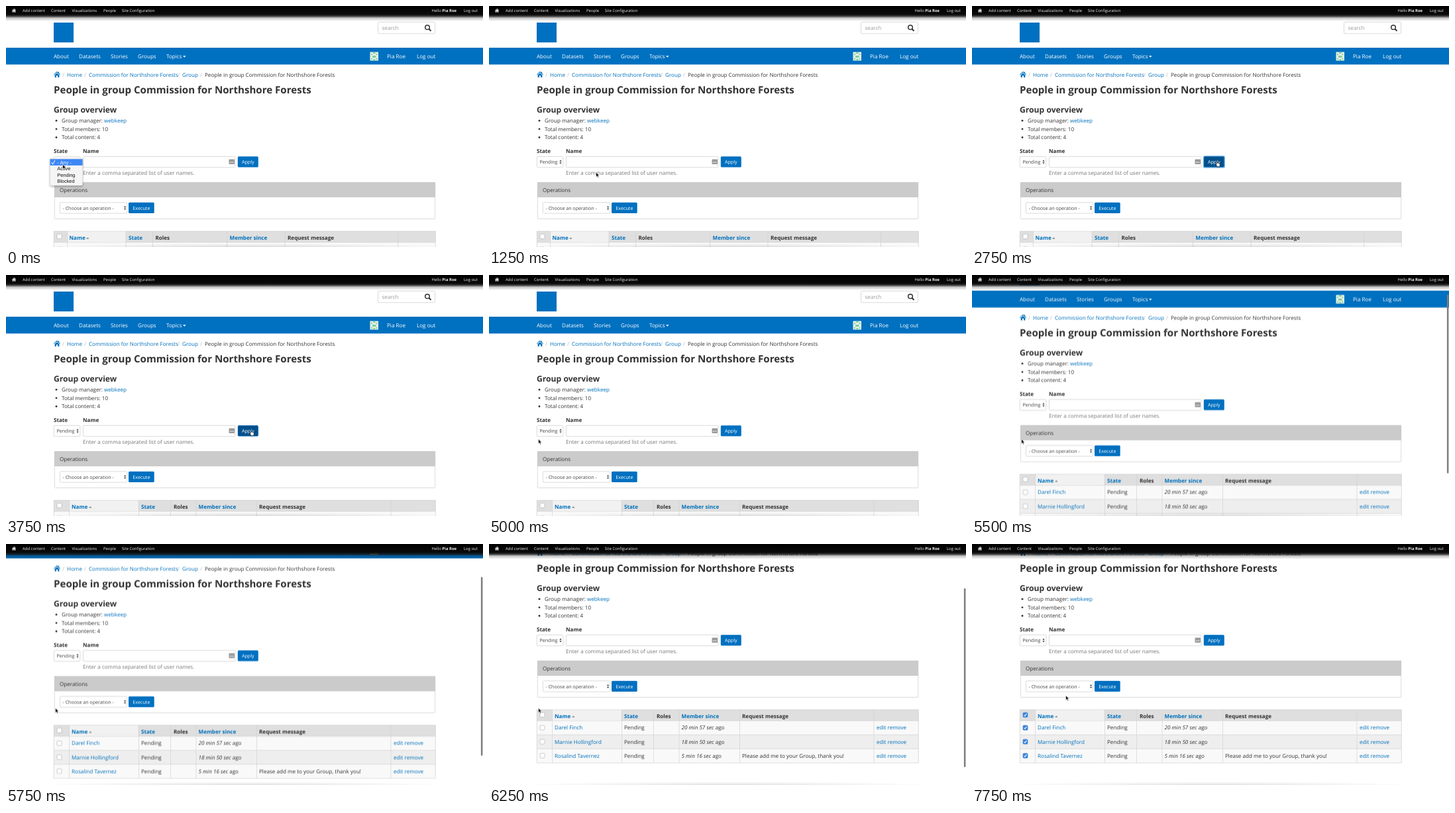
These frames come from a looping animation (720x364 px, 8 s). An HTML page:

```html
<!DOCTYPE html>
<html lang="en">
<head>
<meta charset="utf-8">
<title>Group members</title>
<style>
html, body { margin: 0; width: 100%; height: 100%; overflow: hidden; background: #fff; }
svg {
  display: block; width: 720px; height: 364px; fill: #333;
  font: 8.1px "Open Sans", sans-serif; text-rendering: geometricPrecision;
}
.link { fill: #0071bc; }
.b { font-weight: 700; }
.w { fill: #fff; }
.mute { fill: #767676; }
.field { fill: #fff; stroke: #ccc; stroke-width: .7; }
.btn, .nav { fill: #0070c0; }
.label { font-size: 7.2px; fill: #fff; text-anchor: middle; }
.opt { font-size: 7.1px; fill: #444; }
.bar { font-size: 5.95px; fill: #f2f2f2; }
.menu { font: 7.4px "Liberation Sans", Arial, sans-serif; fill: #111; }
.line { fill: none; stroke: #d3d3d3; stroke-width: .7; }
.page, .thumb, .cursor, .arrow, .hand, .popup, .hi, .t0, .t1, .t2, .old, .new, .hover, .ring, .tick, .sb {
  animation: 8s step-end infinite;
}
.page { animation-name: scroll; }
.thumb { animation-name: thumb; }
.sb { animation-name: sb; }
.cursor { animation-name: move; }
.arrow { animation-name: arrow; }
.hand { animation-name: hand; }
.popup { animation-name: popup; }
.hi { animation-name: hi; }
.t0 { animation-name: t0; }
.t1 { animation-name: t1; }
.t2 { animation-name: t2; }
.old { animation-name: old; }
.new { animation-name: new; }
.hover { animation-name: hover; }
.ring { animation-name: ring; }
.tick { animation-name: tick; }
@keyframes scroll {
  0% { transform: translateY(0); }
  65.625% { transform: translateY(-9px); }
  68.75% { transform: translateY(-39.4px); }
  71.875% { transform: translateY(-66.6px); }
  75% { transform: translateY(-83px); }
  78.125%, 100% { transform: translateY(-90px); }
}
@keyframes thumb {
  0% { transform: translateY(0); }
  65.625% { transform: translateY(6.7px); }
  68.75% { transform: translateY(29.5px); }
  71.875% { transform: translateY(49.8px); }
  75% { transform: translateY(62px); }
  78.125%, 100% { transform: translateY(67px); }
}
@keyframes sb {
  0% { opacity: 0; }
  65.625% { opacity: 1; }
  84.375% { opacity: .4; }
  87.5%, 100% { opacity: 0; }
}
@keyframes move {
  0% { transform: translate(86px, 240px); }
  3.125% { transform: translate(87px, 244px); }
  6.25% { transform: translate(88px, 252px); }
  9.375% { transform: translate(89px, 253px); }
  12.5% { transform: translate(106px, 253px); }
  15.625% { transform: translate(162px, 252px); }
  18.75% { transform: translate(230px, 249px); }
  21.875% { transform: translate(304px, 243px); }
  25% { transform: translate(354px, 237px); }
  28.125% { transform: translate(370px, 234.5px); }
  53.125% { transform: translate(310px, 241px); }
  56.25% { transform: translate(190px, 250px); }
  59.375% { transform: translate(96px, 250px); }
  62.5% { transform: translate(75px, 248.6px); }
  81.25% { transform: translate(76px, 250px); }
  84.375% { transform: translate(80px, 254px); }
  87.5% { transform: translate(81px, 255px); }
  96.875%, 100% { transform: translate(142px, 229.6px); }
}
@keyframes arrow { 0% { opacity: 1; } 25% { opacity: 0; } 53.125%, 100% { opacity: 1; } }
@keyframes hand { 0% { opacity: 0; } 25% { opacity: 1; } 53.125%, 100% { opacity: 0; } }
@keyframes popup { 0% { opacity: 1; } 12.5%, 100% { opacity: 0; } }
@keyframes hi {
  0% { transform: translateY(0); }
  3.125% { transform: translateY(9.5px); }
  6.25%, 100% { transform: translateY(19px); }
}
@keyframes t0 { 0% { fill: #fff; } 3.125%, 100% { fill: #111; } }
@keyframes t1 { 0% { fill: #111; } 3.125% { fill: #fff; } 6.25%, 100% { fill: #111; } }
@keyframes t2 { 0% { fill: #111; } 6.25%, 100% { fill: #fff; } }
@keyframes old { 0% { opacity: 1; } 43.75%, 100% { opacity: 0; } }
@keyframes new { 0% { opacity: 0; } 43.75%, 100% { opacity: 1; } }
@keyframes hover { 0% { opacity: 0; } 25% { opacity: 1; } 53.125%, 100% { opacity: 0; } }
@keyframes ring { 0% { opacity: 0; } 31.25% { opacity: 1; } 43.75%, 100% { opacity: 0; } }
@keyframes tick { 0% { opacity: 0; } 87.5%, 100% { opacity: 1; } }
</style>
</head>
<body>
<svg viewBox="0 0 720 364">
  <defs>
    <linearGradient id="shade" x2="0" y2="1">
      <stop offset="0"/><stop offset=".55" stop-color="#0a0a0a"/>
      <stop offset=".66" stop-color="#111" stop-opacity=".85"/>
      <stop offset=".8" stop-color="#222" stop-opacity=".25"/>
      <stop offset="1" stop-color="#222" stop-opacity="0"/>
    </linearGradient>
    <radialGradient id="foot" cy="1">
      <stop offset="0" stop-opacity=".12"/><stop offset="1" stop-opacity="0"/>
    </radialGradient>
    <filter id="soft" x="-20%" y="-20%" width="140%" height="150%">
      <feDropShadow dx="0" dy="1.5" stdDeviation="1.5" flood-opacity=".35"/>
    </filter>
    <path id="house" d="M0 4.6 5 0l1.8 1.6V.6h1.3v2.2L10 4.6l-.7.7L5 1.5.7 5.3zM1.6 5.4 5 2.4l3.4 3V9H6V6.2H4V9H1.6z"/>
    <path id="spin" d="M0-.8 1.6-3 3.2-.8zM0 .8 1.6 3 3.2 .8z"/>
    <rect id="box" width="7" height="7" rx="1.4" fill="#fff" stroke="#b5b5b5" stroke-width=".7"/>
    <g id="on">
      <rect x="-.2" y="-.2" width="7.4" height="7.4" rx="1.5" fill="#3583dc"/>
      <path d="M1.6 3.7 3 5.2 5.5 1.6" fill="none" stroke="#fff" stroke-width="1.1"/>
    </g>
  </defs>

  <g class="page">
    <rect x="72" y="25" width="30" height="30" fill="#0070c0"/>
    <rect class="field" x="561.5" y="24.3" width="86" height="17.4" rx="1.5"/>
    <text x="567.5" y="36.2" fill="#999">search</text>
    <g fill="none" stroke="#333" stroke-width="1.5">
      <circle cx="636" cy="32.2" r="3.3"/><path d="m638.5 34.7 3 3" stroke-width="2"/>
    </g>

    <rect class="nav" y="63" width="720" height="25.4"/>
    <g class="w">
      <text x="72" y="78.8">About</text>
      <text x="110" y="78.8">Datasets</text>
      <text x="158" y="78.8">Stories</text>
      <text x="199" y="78.8">Groups</text>
      <text x="242" y="78.8">Topics</text>
      <path d="M267 75.2h4.6l-2.3 2.5z"/>
      <text x="575" y="78.8">Pia Roe</text>
      <text x="620" y="78.8">Log out</text>
    </g>
    <rect x="549.5" y="69.5" width="12.5" height="13" fill="#e6f1e8"/>
    <path d="M551 72h2v2h-2zM558.5 72h2v2h-2zM554 70h3.5v2H554zM553 75h5.5v3H553zM551 79h2v2h-2zM558.5 79h2v2h-2zM554.5 80h2.5v2h-2.5z" fill="#7fce9a"/>

    <use href="#house" class="link" x="72" y="98.8"/>
    <g fill="#bbb">
      <text x="85" y="106.8">/</text><text x="118" y="106.8">/</text>
      <text x="259" y="106.8">/</text><text x="293" y="106.8">/</text>
    </g>
    <g class="link">
      <text x="92" y="106.8">Home</text>
      <text x="125" y="106.8">Commission for Northshore Forests</text>
      <text x="266" y="106.8">Group</text>
    </g>
    <text x="300" y="106.8">People in group Commission for Northshore Forests</text>
    <text class="b" x="72" y="131.6" font-size="15.1">People in group Commission for Northshore Forests</text>
    <text class="b" x="72" y="161" font-size="12.15">Group overview</text>
    <g>
      <circle cx="76" cy="173.2" r="1.4"/><circle cx="76" cy="185.8" r="1.4"/><circle cx="76" cy="198.5" r="1.4"/>
      <text x="84" y="175.9">Group manager: <tspan class="link">webkeep</tspan></text>
      <text x="84" y="188.5">Total members: 10</text>
      <text x="84" y="201.2">Total content: 4</text>
    </g>

    <text class="b" x="72" y="221.6">State</text>
    <text class="b" x="116" y="221.6">Name</text>
    <rect class="field" x="72.3" y="227.3" width="39.5" height="16.5" rx="1.5"/>
    <text class="opt" x="76.5" y="238.1">Pending</text>
    <use href="#spin" x="106.4" y="235.5"/>
    <rect class="field" x="116.4" y="227.3" width="229.4" height="16.5" rx="1.5"/>
    <rect x="336.5" y="231.5" width="8.5" height="7.6" rx="1" fill="#999"/>
    <path d="M338 236.2h5.5" stroke="#fff" stroke-width="1.2" stroke-dasharray="1.2 .9"/>
    <rect class="btn" x="349.8" y="227.2" width="31" height="16.3" rx="1.5"/>
    <rect class="ring" x="349.6" y="226.8" width="31.6" height="17.1" rx="2" fill="none" stroke="#72b5ea" stroke-width="1.6"/>
    <rect class="hover" x="350.2" y="227.5" width="30.2" height="15.7" rx="1.5" fill="#00508c"/>
    <text class="label" x="365.3" y="238">Apply</text>
    <text class="mute" x="116" y="254.8">Enter a comma separated list of user names.</text>

    <rect class="field" x="73.3" y="266.5" width="574.4" height="55" rx="1"/>
    <rect x="73" y="266.2" width="575" height="22.8" fill="#cbcbcb"/>
    <text x="81" y="280.7">Operations</text>
    <rect class="field" x="81.4" y="296.8" width="101.4" height="16.4" rx="1.5"/>
    <text class="opt" x="85.5" y="307.5">- Choose an operation -</text>
    <use href="#spin" x="178" y="305"/>
    <rect class="btn" x="185" y="296.7" width="38.7" height="16.3" rx="1.5"/>
    <text class="label" x="204.4" y="307.5">Execute</text>

    <rect x="72" y="340" width="576.5" height="17" fill="#dfdfdf"/>
    <rect x="72" y="357" width="576.5" height="21.2" fill="#f9f9f9"/>
    <rect x="72" y="378.2" width="576.5" height="21.2" fill="#eee"/>
    <rect x="72" y="399.4" width="576.5" height="21.2" fill="#f9f9f9"/>
    <path class="line" d="M72.3 340.3h576v80.3h-576zM72 357h576.5M72 378.2h576.5M72 399.4h576.5"/>
    <g class="old">
      <rect x="92.5" y="340.5" width="88.5" height="16.3" fill="#f1f1f1"/>
      <path class="line" d="M92.5 340v24M181 340v24M221.5 340v24M333.5 340v24M421 340v24M591.5 340v24"/>
      <g class="b">
        <text class="link" x="95.5" y="352.8">Name</text>
        <text class="link" x="185" y="352.8">State</text>
        <text x="225.5" y="352.8">Roles</text>
        <text class="link" x="337.5" y="352.8">Member since</text>
        <text x="425" y="352.8">Request message</text>
      </g>
      <path d="M121 352h4.6l-2.3-3z" fill="#999"/>
    </g>
    <g class="new">
      <rect x="95.8" y="340.5" width="104" height="16.3" fill="#f1f1f1"/>
      <path class="line" d="M95.5 340v80.5M200.5 340v80.5M248.5 340v80.5M287 340v80.5M378.5 340v80.5M581 340v80.5"/>
      <g class="b">
        <text class="link" x="99" y="352.8">Name</text>
        <text class="link" x="204" y="352.8">State</text>
        <text x="253" y="352.8">Roles</text>
        <text class="link" x="290.5" y="352.8">Member since</text>
        <text x="382" y="352.8">Request message</text>
      </g>
      <path d="M125 352h4.6l-2.3-3z" fill="#999"/>
      <g id="rows"></g>
      <text x="382" y="412.6">Please add me to your Group, thank you!</text>
    </g>
    <g id="checks"></g>
  </g>

  <rect x="50" y="354" width="620" height="10" fill="url(#foot)"/>
  <g class="sb"><rect class="thumb" x="716.9" y="0" width="2.5" height="270" rx="1.2" fill="#7d7d7d"/></g>

  <rect width="720" height="23" fill="url(#shade)"/>
  <g class="bar">
    <use href="#house" transform="translate(8.8 4) scale(.64)"/>
    <text x="25" y="9.3">Add content</text>
    <text x="68" y="9.3">Content</text>
    <text x="99.5" y="9.3">Visualizations</text>
    <text x="147" y="9.3">People</text>
    <text x="174.8" y="9.3">Site Configuration</text>
    <text x="642.5" y="9.3">Hello <tspan font-weight="700">Pia Roe</tspan></text>
    <text x="691" y="9.3">Log out</text>
  </g>

  <g class="popup menu">
    <rect x="66.5" y="230" width="49" height="41" rx="2" fill="#f5f5f5" stroke="#ccc" stroke-width=".4" filter="url(#soft)"/>
    <rect class="hi" x="66.5" y="231.2" width="49" height="9.6" fill="#3d87f5"/>
    <path class="t0" d="m69 235.8 1.6 2.2 3-5 .8.5-3.7 6.1-2.4-3.1z"/>
    <text class="t0" x="77.3" y="238.6">- Any -</text>
    <text class="t1" x="77.3" y="248.1">Active</text>
    <text class="t2" x="77.3" y="257.6">Pending</text>
    <text x="77.3" y="267.1">Blocked</text>
  </g>

  <g class="cursor" stroke="#fff" stroke-width=".6">
    <path class="arrow" fill="#000" d="M-.4-.8v7l1.6-1.5 1.1 2.5 1.2-.5-1.1-2.4h2.2z"/>
    <path class="hand" fill="#fff" stroke="#000" d="M-.8.6C-.8-.3.5-.3.5.6v2.2c.3-.4 1.2-.3 1.3.3.4-.4 1.2-.2 1.3.4.5-.3 1.2 0 1.2.6v1.6c0 .8-.5 1.2-.6 2.4H.2C-.2 6.9-1.5 6-2 4.7c-.3-.8.6-1 1.2-.2z"/>
  </g>
</svg>
<script>
const people = [
  ["Darel Finch", "20 min 57 sec"],
  ["Marnie Hollingford", "18 min 50 sec"],
  ["Rosalind Tavernez", "5 min 16 sec"],
];
const ROW = 21.1;
const text = (x, y, body, cls = "") => `<text class="${cls}" x="${x}" y="${y}">${body}</text>`;

rows.innerHTML = people.map(([name, since], i) => {
  const y = 370.4 + i * ROW;
  return text(99, y, name, "link") + text(204, y, "Pending")
    + text(290.5, y, `<tspan font-style="italic">${since}</tspan> ago`)
    + text(585, y, "edit remove", "link");
}).join("");

checks.innerHTML = [344.6, ...people.map((_, i) => 364 + i * ROW)].map(y =>
  `<use href="#box" x="77" y="${y}"/><use class="tick" href="#on" x="77" y="${y}"/>`).join("");
</script>
</body>
</html>
```
